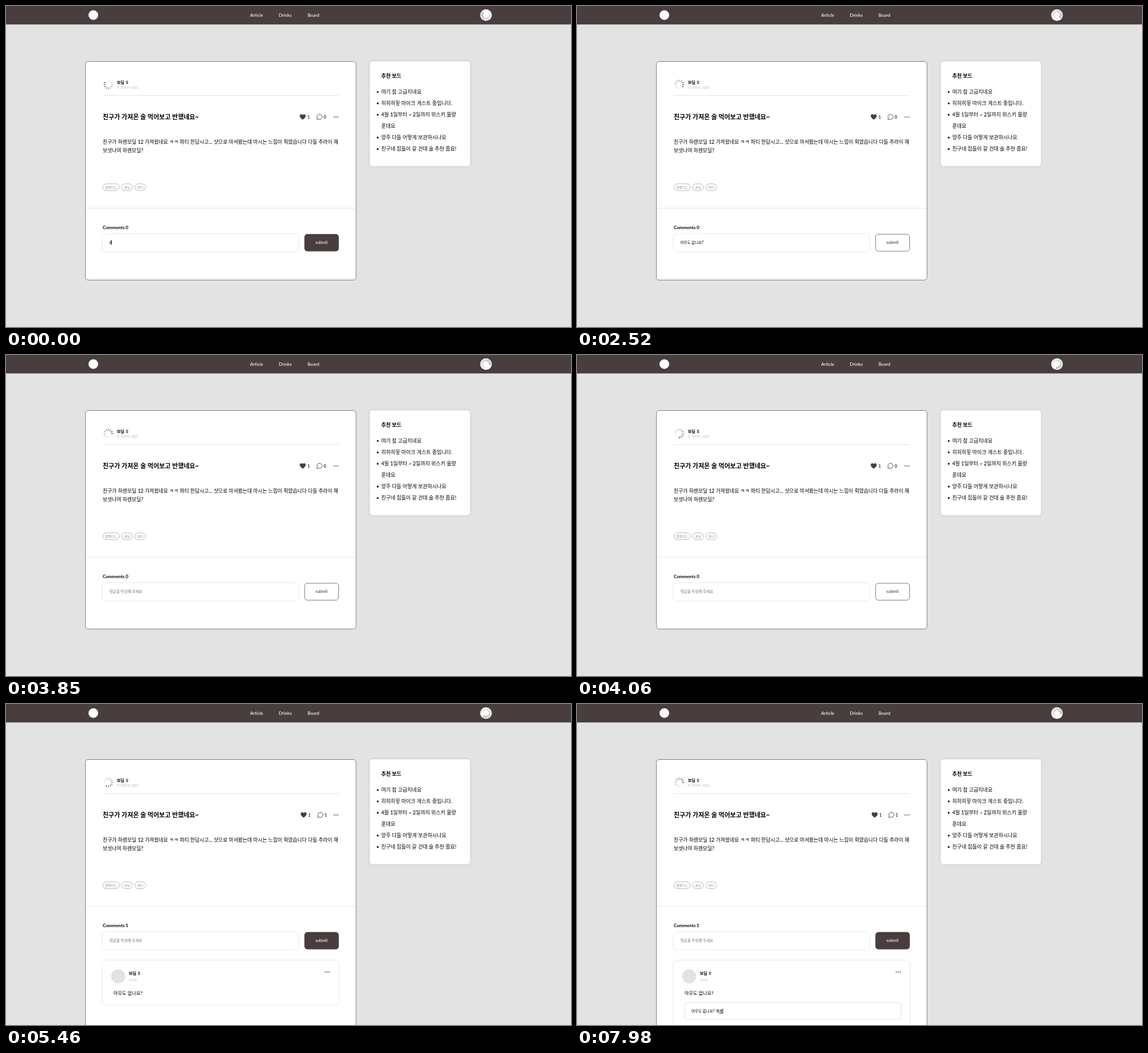
These frames come from a looping animation (993x564 px, 8 s). An HTML page:

```html
<!DOCTYPE html>
<html lang="ko">
<head>
<meta charset="utf-8">
<style>
  html, body { margin: 0; width: 100%; height: 100%; overflow: hidden; background: #e3e3e3; }
  svg { display: block; width: 993px; height: 564px; }
  text { font: 500 9px Lato, "Noto Sans CJK KR", sans-serif; fill: #000; white-space: pre; }
  .nav { font-size: 7.9px; fill: #fff; }
  .b { font-weight: 700; }
  .body { font-size: 8.85px; }
  .name { font-size: 7px; font-weight: 700; }
  .ago { font-size: 8.1px; font-weight: 400; fill: #c6c6c6; }
  .s { font-size: 6.6px; }
  .tag text { font-size: 5.6px; fill: #888; text-anchor: middle; }
  .tag rect { fill: none; stroke: #a5a5a5; stroke-width: .8; }
  .sh { fill: #fff; filter: drop-shadow(0 0 2px #0002); }
  .dlg text { font-family: "Noto Sans", "Noto Sans CJK KR", sans-serif; }
  .dlg > rect:first-child { filter: drop-shadow(0 1px 3px #0005); }
  .line { stroke: #e4e4e4; }
  .mid { text-anchor: middle; }
</style>
</head>
<body>
<svg viewBox="0 0 993 564">
  <defs>
    <g id="dots" fill="#473e3d"><circle r=".9"/><circle cx="3.4" r=".9"/><circle cx="6.8" r=".9"/></g>
  </defs>
  <rect width="993" height="564" fill="#e3e3e3"/>
  <rect width="993" height="32.4" fill="#473e3d"/>
  <circle cx="153.5" cy="16" r="8.5" fill="#fff"/>
  <text class="nav" x="429" y="19">Article</text>
  <text class="nav" x="479.5" y="19">Drinks</text>
  <text class="nav" x="530" y="19">Board</text>
  <circle cx="843.6" cy="16" r="10.2" fill="#fff"/>
  <g class="spin" transform="translate(843.6 16)"></g>

  <rect id="page" x="139.5" y="97.5" width="475.7" height="384" rx="5" fill="#fff" stroke="#473e3d" stroke-width=".65"/>
  <g class="spin" transform="translate(179.8 138)"></g>
  <text class="name" x="195" y="136.5">보딤 ㅎ</text>
  <text class="ago" x="195" y="145.3">6 days ago</text>
  <path class="line" d="M170 157.5H585"/>
  <text class="b" x="170" y="198.8" style="font-size:11px">친구가 가져온 술 먹어보고 반했네요~</text>
  <g id="counts" fill="#473e3d">
    <path d="M521.5 199.8C518 197 516.3 195.4 516.3 193.2C516.3 190 520 189.4 521.5 191.8C523 189.4 526.7 190 526.7 193.2C526.7 195.4 525 197 521.5 199.8Z"/>
    <text x="529.7" y="197.7" style="font-size:7.5px">1</text>
    <path d="M546.4 199.3L547 196.8A4.5 4.5 0 1 1 549 198.8Z" fill="none" stroke="#473e3d" stroke-width=".9" stroke-linejoin="round"/>
  </g>
  <text id="count" y="197.7" style="font-size:7.5px"></text>
  <use href="#dots" x="576.6" y="195"/>
  <text class="body" x="170" y="242.3">친구가 하렌모딜 12 가져왔네요 ㅋㅋ 파티 한답시고... 샷으로 마셔봤는데 마시는 느낌이 쥑였습니다 다들 추라이 해</text>
  <text class="body" x="170" y="257.3">보셧나여 하렌모딜?</text>
  <g class="tag">
    <rect x="170.3" y="312.5" width="28.8" height="12" rx="6"/><text x="184.7" y="320.6">블렌디드</text>
    <rect x="203.3" y="312.5" width="19" height="12" rx="6"/><text x="212.8" y="320.6">손님</text>
    <rect x="226.5" y="312.5" width="19" height="12" rx="6"/><text x="236" y="320.6">파티</text>
  </g>
  <path class="line" d="M140 355.3H614.6"/>
  <text id="total" class="b" x="170" y="392.3" style="font-size:8px"></text>
  <rect class="sh" x="170" y="401" width="343.5" height="30.5" rx="6"/>
  <text id="field" class="s" x="181.5" y="418.2"></text>
  <rect id="caret" y="411.5" width=".8" height="8.5"/>
  <rect id="button" x="524.8" y="401" width="59.8" height="29.8" rx="5" stroke="#473e3d" stroke-width=".7"/>
  <text id="submit" class="mid" x="554.6" y="418.4" style="font-size:7.2px">submit</text>

  <g id="comment">
    <rect id="card" class="sh" x="170" y="451" width="414.5" height="77" rx="6"/>
    <circle cx="197.2" cy="478.5" r="12.4" fill="#e2e2e2"/>
    <text class="name" x="216" y="476">보딤 ㅎ</text>
    <text class="ago" x="216" y="486.8" style="font-size:7.4px">now</text>
    <use href="#dots" x="561.2" y="471"/>
    <text x="189" y="511" style="font-size:8.2px">아무도 없나요?</text>
    <g id="edit">
      <rect x="189.3" y="524.6" width="380.2" height="29.8" rx="4" fill="#fff" stroke="#dedede" stroke-width=".9"/>
      <text id="reply" class="s" x="201" y="542"></text>
      <rect id="caret2" y="535.2" width=".8" height="8.5"/>
    </g>
  </g>

  <rect class="sh" x="639.3" y="97.3" width="176.2" height="184.2" rx="5"/>
  <text class="b" x="659.4" y="126">추천 보드</text>
  <g id="list"></g>

  <g id="dialog" class="dlg">
    <rect x="396" y="-30" width="201" height="93" rx="6" fill="#fff"/>
    <text class="b" x="406" y="-1.8" style="font-size:7.5px">web-12-40-77-18.group-</text>
    <text class="b" x="406" y="10" style="font-size:7.5px">parkville-7.quorvadon.com 내용:</text>
    <text x="406" y="25.4" style="font-size:6.3px;font-weight:400">성공적으로 작성되었습니다.</text>
    <rect x="556.5" y="36" width="30.6" height="16.8" rx="1.5" fill="#00bfa5"/>
    <text class="b mid" x="571.8" y="46.6" style="font-size:6.2px;fill:#fff">확인</text>
  </g>
</svg>
<script>
const $ = id => document.getElementById(id);
const LOOP = 8000, DARK = '#473e3d';
const show = (el, on) => el.style.display = on ? '' : 'none';

$('list').innerHTML = ['여기 참 고급지네요', '히히히힣 마이크 게스트 중입니다.', '4월 1일부터 ~ 2일까지 위스키 물량',
  '푼데요', '양주 다들 어떻게 보관하시나요', '친구네 집들이 갈 건데 술 추천 좀요!']
  .map((s, i) => (i === 3 ? '' : `<circle cx="653.3" cy="${151 + i * 20.05}" r="1.6"/>`) +
    `<text x="659.4" y="${154 + i * 20.05}">${s}</text>`).join('');

const spinners = [...document.querySelectorAll('.spin')];
for (const g of spinners)
  g.innerHTML = Array.from({length: 12}, (_, i) =>
    `<path d="M0-5.2V-8.6" stroke="#444" stroke-width="1.2" transform="rotate(${i * 30})"/>`).join('');

// Typing steps: [time, settled text, syllable being composed]
const typed = [[0, 'd', ''], [140, '', ''], [350, '', 'ㅇ'], [420, '', '아'], [490, '', '암'], [560, '아', '무'],
  [630, '아', '묻'], [700, '아무', '도'], [840, '아무도 ', ''], [910, '아무도 ', 'ㅇ'], [980, '아무도 ', '어'],
  [1120, '아무도 ', '업'], [1190, '아무도 ', '없'], [1260, '아무도 없', 'ㄴ'], [1330, '아무도 없', '나'],
  [1400, '아무도 없', '낭'], [1540, '아무도 없나', '요'], [1680, '아무도 없나요?', '']];
const edited = [[0, '아무도 없나요?', ''], [7420, '아무도 없나요? ', ''], [7560, '아무도 없나요? ', 'ㄱ'],
  [7700, '아무도 없나요? ', '계'], [7840, '아무도 없나요? ', '곗'], [7980, '아무도 없나요? 계', '세']];

function type(el, caret, steps, t, blink) {
  const [, done, live] = steps.findLast(s => s[0] <= t);
  el.innerHTML = done + (live && `<tspan text-decoration="underline">${live}</tspan>`);
  el.style.fill = '';
  caret.setAttribute('x', +el.getAttribute('x') + el.getComputedTextLength());
  show(caret, blink);
}

function draw(t) {
  const head = Math.round(10 + Math.floor(t / 94.8) * 94.8 / 700 * 12);
  for (const g of spinners)
    [...g.children].forEach((p, i) => {
      const age = ((head - i) % 12 + 12) % 12;
      p.setAttribute('opacity', Math.max(.08, 1 - age / 11));
    });

  const posted = t >= 4200, cleared = t >= 3570, editing = t >= 6370;
  if (cleared) {
    $('field').textContent = '댓글을 작성해 주세요';
    $('field').style.fill = '#757575';
    $('caret').setAttribute('x', 181.3);
    show($('caret'), t >= 4760 && t < 5250);
  } else type($('field'), $('caret'), typed, t, t < 2240);

  const hover = t >= 2310 && !posted, pressed = t >= 2590 && !cleared;
  $('button').setAttribute('fill', pressed ? '#f0f0f0' : hover ? '#fff' : DARK);
  $('submit').style.fill = hover ? DARK : '#fff';

  const n = posted ? 1 : 0;
  $('count').textContent = n;
  $('count').setAttribute('x', posted ? 559.8 : 558.3);
  $('total').textContent = 'Comments ' + n;
  $('counts').setAttribute('transform', `translate(${n * 1.6})`);
  $('page').setAttribute('height', posted ? 520 : 384);
  show($('comment'), posted);
  show($('edit'), editing);
  $('card').setAttribute('height', editing ? 150 : 77);
  if (editing) type($('reply'), $('caret2'), edited, t, t >= 7140);

  const fade = Math.min((t - 2590) / 140, (3640 - t) / 140);
  $('dialog').setAttribute('opacity', Math.max(0, Math.min(1, fade)));
}

const start = performance.now();
(function tick() {
  draw((performance.now() - start) % LOOP);
  requestAnimationFrame(tick);
})();
</script>
</body>
</html>
```
